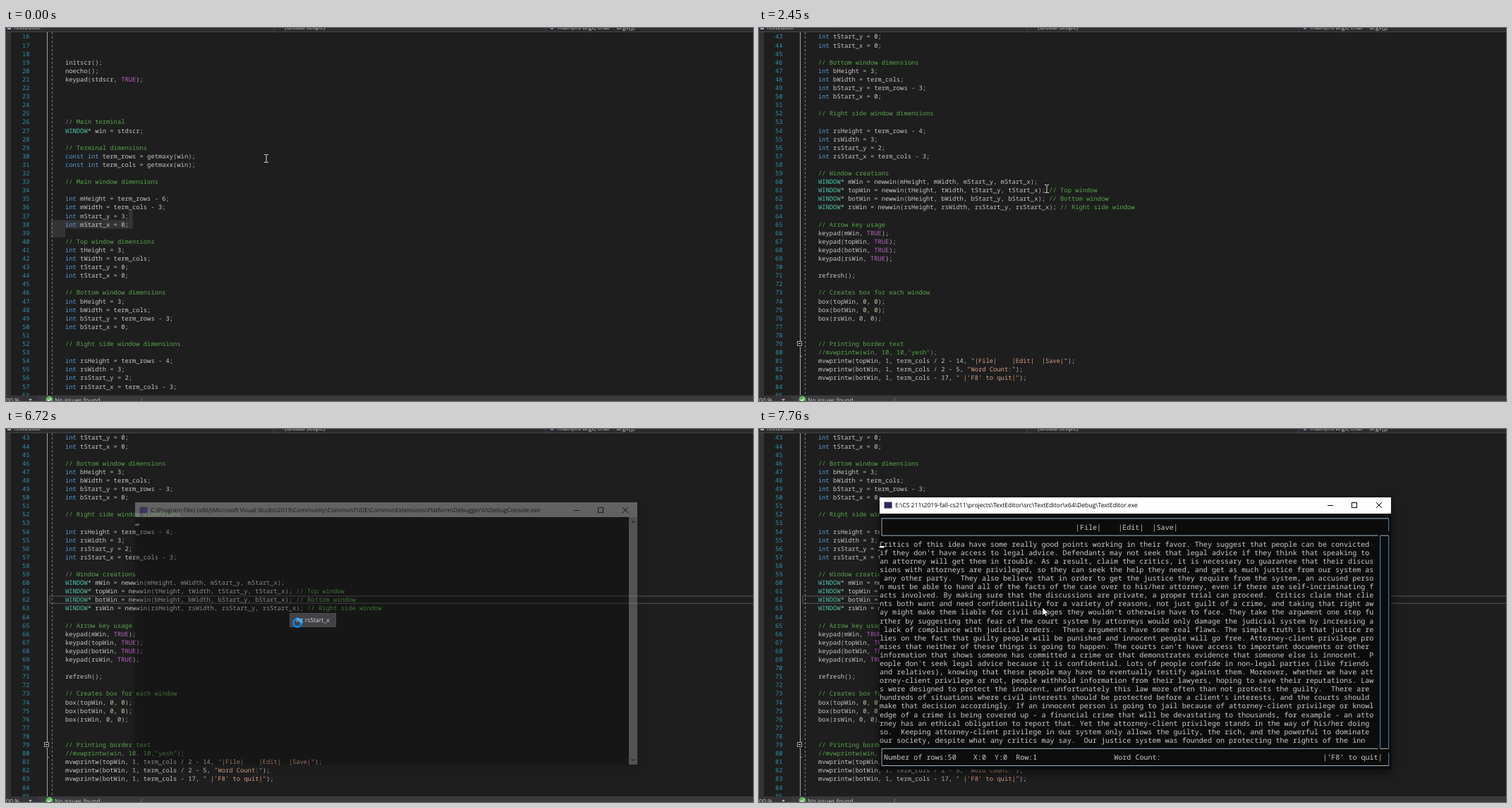
Write an HTML page with a canvas that moves like this. It is 1059 px wide and 529 px high and loops after 8000 ms.

```html
<!DOCTYPE html>
<html lang="en">
<head>
<meta charset="utf-8">
<title>Text editor run</title>
<style>
html, body { margin: 0; width: 100%; height: 100%; overflow: hidden; background: #1e1e1e; }
canvas { display: block; }
</style>
</head>
<body>
<canvas id="stage" width="1059" height="529"></canvas>
<script>
const ctx = document.getElementById('stage').getContext('2d');
const LOOP = 8000, FIRST_LINE = 16;
const UI = '8.6px "Open Sans", sans-serif', UI_SMALL = '8.38px "Open Sans", sans-serif';
const CODE = '8.8px "Noto Sans Mono", monospace', CODE_W = 5.278, CODE_H = 12.1;
const TERM = '10.07px "Noto Sans Mono", monospace', TERM_W = 6.04, TERM_H = 12.09;

const code = `


initscr();
noecho();
keypad(stdscr, TRUE);




// Main terminal
WINDOW* win = stdscr;

// Terminal dimensions
const int term_rows = getmaxy(win);
const int term_cols = getmaxx(win);

// Main window dimensions

int mHeight = term_rows - 6;
int mWidth = term_cols - 3;
int mStart_y = 3;
int mStart_x = 0;

// Top window dimensions
int tHeight = 3;
int tWidth = term_cols;
int tStart_y = 0;
int tStart_x = 0;

// Bottom window dimensions
int bHeight = 3;
int bWidth = term_cols;
int bStart_y = term_rows - 3;
int bStart_x = 0;

// Right side window dimensions

int rsHeight = term_rows - 4;
int rsWidth = 3;
int rsStart_y = 2;
int rsStart_x = term_cols - 3;

// Window creations
WINDOW* mWin = newwin(mHeight, mWidth, mStart_y, mStart_x);
WINDOW* topWin = newwin(tHeight, tWidth, tStart_y, tStart_x); // Top window
WINDOW* botWin = newwin(bHeight, bWidth, bStart_y, bStart_x); // Bottom window
WINDOW* rsWin = newwin(rsHeight, rsWidth, rsStart_y, rsStart_x); // Right side window

// Arrow key usage
keypad(mWin, TRUE);
keypad(topWin, TRUE);
keypad(botWin, TRUE);
keypad(rsWin, TRUE);

refresh();

// Creates box for each window
box(topWin, 0, 0);
box(botWin, 0, 0);
box(rsWin, 0, 0);


// Printing border text
//mvwprintw(win, 10, 10,"yesh");
mvwprintw(topWin, 1, term_cols / 2 - 14, "|File|    |Edit|  |Save|");
mvwprintw(botWin, 1, term_cols / 2 - 5, "Word Count:");
mvwprintw(botWin, 1, term_cols - 17, " |'F8' to quit|");

`.split('\n');

const essay = `Critics of this idea have some really good points working in their favor. They suggest that people can be convicted
if they don't have access to legal advice. Defendants may not seek that legal advice if they think that speaking to
an attorney will get them in trouble. As a result, claim the critics, it is necessary to guarantee that their discus
sions with attorneys are privileged, so they can seek the help they need, and get as much justice from our system as
 any other party.  They also believe that in order to get the justice they require from the system, an accused perso
n must be able to hand all of the facts of the case over to his/her attorney, even if there are self-incriminating f
acts involved. By making sure that the discussions are private, a proper trial can proceed.  Critics claim that clie
nts both want and need confidentiality for a variety of reasons, not just guilt of a crime, and taking that right aw
ay might make them liable for civil damages they wouldn't otherwise have to face. They take the argument one step fu
rther by suggesting that fear of the court system by attorneys would only damage the judicial system by increasing a
 lack of compliance with judicial orders.  These arguments have some real flaws. The simple truth is that justice re
lies on the fact that guilty people will be punished and innocent people will go free. Attorney-client privilege pro
mises that neither of these things is going to happen. The courts can't have access to important documents or other
information that shows someone has committed a crime or that demonstrates evidence that someone else is innocent.  P
eople don't seek legal advice because it is confidential. Lots of people confide in non-legal parties (like friends
and relatives), knowing that these people may have to eventually testify against them. Moreover, whether we have att
orney-client privilege or not, people withhold information from their lawyers, hoping to save their reputations. Law
s were designed to protect the innocent, unfortunately this law more often than not protects the guilty.  There are
hundreds of situations where civil interests should be protected before a client's interests, and the courts should
make that decision accordingly. If an innocent person is going to jail because of attorney-client privilege or knowl
edge of a crime is being covered up - a financial crime that will be devastating to thousands, for example - an atto
rney has an ethical obligation to report that. Yet the attorney-client privilege stands in the way of his/her doing
so.  Keeping attorney-client privilege in our system only allows the guilty, the rich, and the powerful to dominate
our society, despite what any critics may say.  Our justice system was founded on protecting the rights of the inn`.split('\n');

const debugPath = String.raw`C:\Program Files (x86)\Microsoft Visual Studio\2019\Community\Common7\IDE\CommonExtensions\Platform\Debugger\VsDebugConsole.exe`;
const appPath = String.raw`E:\CS 211\2019-fall-cs211\projects\TextEditor\src\TextEditor\x64\Debug\TextEditor.exe`;

// Time, pointer shape, x, y
const pointer = [
  [0, beam, 369, 185], [150, beam, 372, 185], [300, beam, 375, 173],
  [1820, beam, 381, 190], [1970, beam, 393, 205], [2090, beam, 404, 222],
  [2210, beam, 411, 237], [2330, beam, 411, 231], [2450, beam, 408, 228],
  [3970, beam, 405, 237], [4120, beam, 404, 246], [5650, spinner, 403, 246],
  [5800, beam, 405, 262], [6200, spinner, 406, 261], [6350, spinner, 414, 281],
  [6470, spinner, 413, 275], [7150, arrow, 406, 255], [7300, arrow, 405, 255],
  [7450, arrow, 402, 253]
];
const scroll = [[0, 16], [580, 31], [1550, 43]];

const at = (steps, t) => steps.filter(s => s[0] <= t).pop();
const within = (t, from, to) => t >= from && t < to;

function rect(x, y, w, h, color) {
  ctx.fillStyle = color;
  ctx.fillRect(x, y, w, h);
}

function text(str, x, y, color, font) {
  ctx.font = font;
  ctx.fillStyle = color;
  ctx.fillText(str, x, y);
}

function path(points, color, width = 1) {
  ctx.beginPath();
  points.forEach(([x, y]) => ctx.lineTo(x, y));
  ctx.strokeStyle = color;
  ctx.lineWidth = width;
  ctx.stroke();
}

function beam(x, y) {
  const c = '#d8d8d8';
  rect(x - .5, y - 5, 1, 11, c);
  rect(x - 3, y - 6, 2.5, 1, c);
  rect(x + .5, y - 6, 2.5, 1, c);
  rect(x - 3, y + 5, 2.5, 1, c);
  rect(x + .5, y + 5, 2.5, 1, c);
}

function spinner(x, y, t) {
  const turn = t / 1000 * Math.PI * 2;
  const ring = (from, to, color) => {
    ctx.beginPath();
    ctx.arc(x, y, 5.6, from, to);
    ctx.strokeStyle = color;
    ctx.lineWidth = 3.2;
    ctx.stroke();
  };
  ring(0, 7, '#0f7fdc');
  ring(turn, turn + 1.8, '#45b4fa');
}

function arrow(x, y) {
  const p = [[0, 0], [0, 11.5], [2.7, 9], [4.5, 13], [6.4, 12.2], [4.7, 8.3], [8.4, 8.2]];
  ctx.beginPath();
  p.forEach(([dx, dy]) => ctx.lineTo(x + dx, y + dy));
  ctx.closePath();
  ctx.fillStyle = '#fff';
  ctx.fill();
  ctx.strokeStyle = '#000';
  ctx.lineWidth = .7;
  ctx.stroke();
}

const colors = ['#57a64a', '#d69d85', '#569cd6', '#4ec9b0', '#bd63c5', '#b5cea8', '#c8c8c8', '#b4b4b4'];
const tokens = /(\/\/.*)|("[^"]*")|\b(int|const)\b|\b(WINDOW)\b|\b(TRUE)\b|\b(\d+)\b|(\w+)|([^\w\s"]+)/g;

function codeLine(str, y) {
  for (const m of str.matchAll(tokens)) {
    text(m[0], 84 + m.index * CODE_W, y, colors[m.slice(1).findIndex(Boolean)], CODE);
  }
}

function editor(t) {
  const first = at(scroll, t)[1];
  const mid = n => 12.2 + (n - first) * CODE_H;
  rect(0, 0, 1059, 529, '#1e1e1e');
  rect(0, 6, 7, 515, '#333333');

  // Selection left over around line 38
  const mark = (n, x, w) => rect(x, mid(n) - 6, w, CODE_H, '#343437');
  if (first === FIRST_LINE) {
    mark(37, 173.7, 6);
    mark(38, 63, 117);
    mark(39, 63, 21);
  }
  if (within(t, 5800, 6350)) mark(63, 363.7, 47.5);
  if (t >= 4550) {
    ctx.strokeStyle = '#464646';
    ctx.lineWidth = 1.5;
    ctx.strokeRect(62, 237, 1010, 10.3);
  }

  path([[58.5, 6], [58.5, 521]], '#a5a5a5');
  ctx.setLineDash([3, 3]);
  path([[65.5, 6], [65.5, 521]], '#808080');
  ctx.setLineDash([]);
  const fold = Math.round(mid(79));
  rect(54, fold - 4, 8, 8, '#1e1e1e');
  ctx.strokeStyle = '#a5a5a5';
  ctx.strokeRect(54.5, fold - 3.5, 6, 6);
  path([[56, fold - .5], [59, fold - .5]], '#d0d0d0');
  path([[58, fold + 17.5], [61, fold + 17.5]], '#a5a5a5');

  for (let n = first; n < first + 43; n++) {
    text(n, 23, mid(n) + 3.2, '#2b91af', CODE);
    codeLine(code[n - FIRST_LINE] || '', mid(n) + 3.2);
  }
  if (within(t, 4550, 4980) || within(t, 5500, 6050)) rect(401, 236.5, 1, 10.5, '#dcdcdc');
  bars();
}

function bars() {
  rect(0, 0, 1059, 5, '#2d2d30');
  rect(0, 5, 1059, 1, '#434346');
  rect(379.5, 0, 1, 5, '#46464a');
  rect(764.5, 0, 1, 5, '#46464a');
  rect(2, 0, 5, 2, '#c59ac8');
  rect(772, 0, 4, 1.5, '#b180d7');
  text('TextEditor', 10, 2, '#d0d0d0', UI);
  text('(Global Scope)', 395, 2, '#d0d0d0', UI);
  text('main(int argc, char * argv[])', 782, 2, '#d0d0d0', UI);

  rect(0, 521, 1059, 8, '#3a3a3e');
  rect(0, 521, 46, 8, '#333337');
  text('00 %', 0, 530.5, '#d0d0d0', UI);
  text('No issues found', 69, 530.5, '#d0d0d0', UI);
  ctx.fillStyle = '#b0b0b0';
  ctx.beginPath();
  ctx.moveTo(32, 526); ctx.lineTo(37, 526); ctx.lineTo(34.5, 529);
  ctx.fill();
  ctx.fillStyle = '#5fb45a';
  ctx.beginPath();
  ctx.arc(61.5, 527, 5, 0, 7);
  ctx.fill();
  path([[59, 527], [61, 529], [64, 525]], '#fff', 1.2);
  path([[194, 525], [191, 527.5], [194, 530]], '#77777a');
}

function shadowed(x, y, w, h) {
  ctx.save();
  ctx.shadowColor = 'rgba(0,0,0,.6)';
  ctx.shadowBlur = 14;
  ctx.shadowOffsetY = 4;
  rect(x, y, w, h, '#0c0c0c');
  ctx.restore();
}

function titleInk(x, y, w, title, font) {
  const mid = y + 11, right = x + w;
  rect(x + 6.5, mid - 4.5, 11, 9, '#33265f');
  text(title, x + 22, mid + 3.2, '#000', font);
  path([[right - 90, mid + .5], [right - 82, mid + .5]], '#000');
  ctx.strokeRect(right - 55.5, mid - 3.5, 7, 7);
  path([[right - 21, mid - 4], [right - 13, mid + 4]], '#000');
  path([[right - 21, mid + 4], [right - 13, mid - 4]], '#000');
}

function fadingConsole() {
  ctx.save();
  ctx.globalAlpha = .22;
  shadowed(183, 104, 712, 372);
  ctx.globalAlpha = .32;
  rect(183, 104, 712, 21, '#fff');
  rect(883, 125, 12, 351, '#d0d0d0');
  rect(183, 134.5, 6, 2.5, '#fff');
  ctx.globalAlpha = .75;
  titleInk(183, 104, 712, debugPath, UI_SMALL);
  path([[886.5, 133], [889, 130.5], [891.5, 133]], '#000');
  path([[886.5, 468], [889, 470.5], [891.5, 468]], '#000');
  ctx.restore();
}

function appConsole(t) {
  const row = n => 126.9 + n * TERM_H, col = n => 171 + n * TERM_W;
  const put = (str, c, r) => text(str, col(c), row(r) + 3.6, '#cccccc', TERM);
  const across = (c1, c2, r) => path([[col(c1), row(r)], [col(c2), row(r)]], '#9fb4c4');
  const down = (c, r1, r2, color) => path([[col(c), row(r1)], [col(c), row(r2)]], color);
  const opening = t < 7000;
  const blue = opening ? '#7b95a8' : '#4f8fc8', grey = '#b0aca6';
  ctx.save();
  if (opening) {
    rect(160, 86, 739, 413, 'rgba(0,0,0,.42)');
    ctx.translate(533, 288);
    ctx.scale(.993, .993);
    ctx.translate(-533, -288);
    rect(171, 97, 725, 386, '#0c0c0c');
  } else {
    shadowed(171, 97, 725, 386);
  }
  rect(171, 97, 725, 23, opening ? '#e6e6e6' : '#fff');
  titleInk(171, 97, 725, appPath, UI);

  across(.5, 119.5, 0);
  across(.5, 117, 2);
  across(117.5, 119.5, 2);
  across(.5, 117, 27);
  across(117.5, 119.5, 27);
  across(.5, 119.5, 29);
  down(.5, 0, 2, grey);
  down(.5, 27, 29, grey);
  down(119.5, 0, 1.5, blue);
  down(119.5, 2, 27, blue);
  down(117.5, 2, 27, blue);
  down(119.5, 27.5, 29, blue);

  put('|File|    |Edit|  |Save|', 46, 1);
  essay.forEach((line, i) => put(line, 0, i + 3));
  put('Number of rows:50    X:0  Y:0  Row:1', 1, 28);
  put('Word Count:', 55, 28);
  put("|'F8' to quit|", 104, 28);
  if (!within(t, 7300, 7760)) rect(171, 166, 6.5, 2.4, '#fff');
  ctx.restore();
}

function tooltip() {
  rect(402, 261, 66, 20, '#4d4d50');
  rect(403, 262, 64, 18, '#424245');
  text('int rsStart_x', 411, 274.3, '#d8d8d8', UI);
}

function draw(t) {
  editor(t);
  if (within(t, 6720, 6870)) fadingConsole();
  if (t >= 6870) appConsole(t);
  if (within(t, 6050, 7150)) tooltip();
  const [, shape, x, y] = at(pointer, t);
  shape(x, y, t);
}

ctx.textRendering = 'geometricPrecision';
const start = performance.now();
function tick() {
  draw((performance.now() - start) % LOOP);
  requestAnimationFrame(tick);
}
tick();
</script>
</body>
</html>
```
